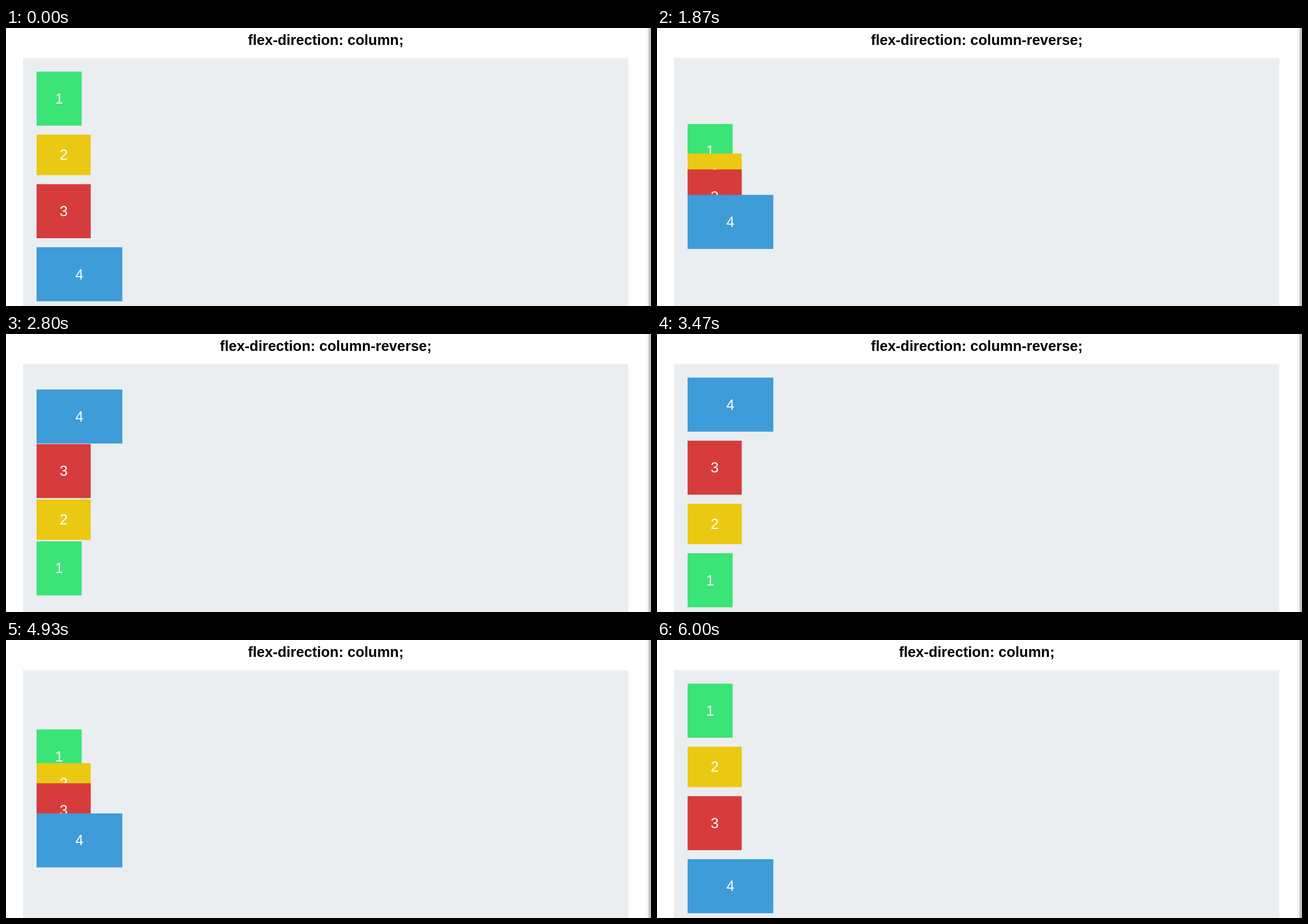
Write an HTML page with a canvas that moves like this. It is 1139x492 px and loops after 6070 ms.

```html
<!DOCTYPE html>
<html lang="en">
<head>
<meta charset="utf-8">
<title>flex-direction</title>
<style>
  html, body { margin: 0; width: 100%; height: 100%; overflow: hidden; background: #fff; }
  canvas { display: block; }
</style>
</head>
<body>
<canvas id="stage" width="1139" height="492"></canvas>
<script>
const ctx = document.getElementById('stage').getContext('2d');
const FONT = '25.5px "Liberation Sans", Arial, sans-serif';
const LOOP = 6070, FPS = 15;
const TO_REVERSE = 1250, TO_COLUMN = 3850, DURATION = 2200;
const LEFT = 54, TOP = 77.2, GAP = 16;

const items = [
  { w: 79.6, h: 95.6, color: '#3be477' },
  { w: 95.6, h: 71.6, color: '#ebc913' },
  { w: 95.6, h: 95.6, color: '#d73c3c' },
  { w: 151.4, h: 95.6, color: '#3e9cd8' },
];

// Stack the items from the top and remember each offset under the given key.
function layout(list, key) {
  let y = TOP;
  for (const item of list) {
    item[key] = y;
    y += item.h + GAP;
  }
}
layout(items, 'column');
layout([...items].reverse(), 'reverse');

// cubic-bezier(.384, 0, .252, 1)
function ease(x) {
  if (x <= 0) return 0;
  if (x >= 1) return 1;
  const curve = (s, a, b) => 3 * a * s * (1 - s) ** 2 + 3 * b * s * s * (1 - s) + s ** 3;
  let low = 0, high = 1;
  for (let i = 0; i < 24; i++) {
    const mid = (low + high) / 2;
    if (curve(mid, 0.384, 0.252) < x) low = mid; else high = mid;
  }
  return curve(low, 0, 1);
}

function rect(color, x, y, w, h) {
  ctx.fillStyle = color;
  ctx.fillRect(x, y, w, h);
}

function text(value, color, weight, x, y) {
  ctx.font = weight + ' ' + FONT;
  ctx.fillStyle = color;
  ctx.fillText(value, x, y);
}

function draw(time) {
  const reversed = time >= TO_REVERSE && time < TO_COLUMN;
  const progress = ease((time - TO_REVERSE) / DURATION) - ease((time - TO_COLUMN) / DURATION);

  rect('#fff', 0, 0, 1139, 492);
  rect('#eaeef1', 30, 53.5, 1069, 439);
  rect('#fafafa', 1132, 0, 7, 492);
  rect('#e8e8e8', 1131, 0, 1, 492);
  rect('#c1c1c1', 1134.5, 0, 4.5, 492);

  ctx.textAlign = 'center';
  text(`flex-direction: column${reversed ? '-reverse' : ''};`, '#000', 'bold', 564.7, 30);

  items.forEach((item, i) => {
    const y = item.column + (item.reverse - item.column) * progress;
    rect(item.color, LEFT, y, item.w, item.h);
    text(i + 1, '#fff', 'normal', LEFT + item.w / 2, y + item.h / 2 + 8.7);
  });
}

function tick() {
  const time = performance.now() % LOOP;
  draw(Math.floor((time + 4) * FPS / 1000) * 1000 / FPS);
  requestAnimationFrame(tick);
}
tick();
</script>
</body>
</html>
```
